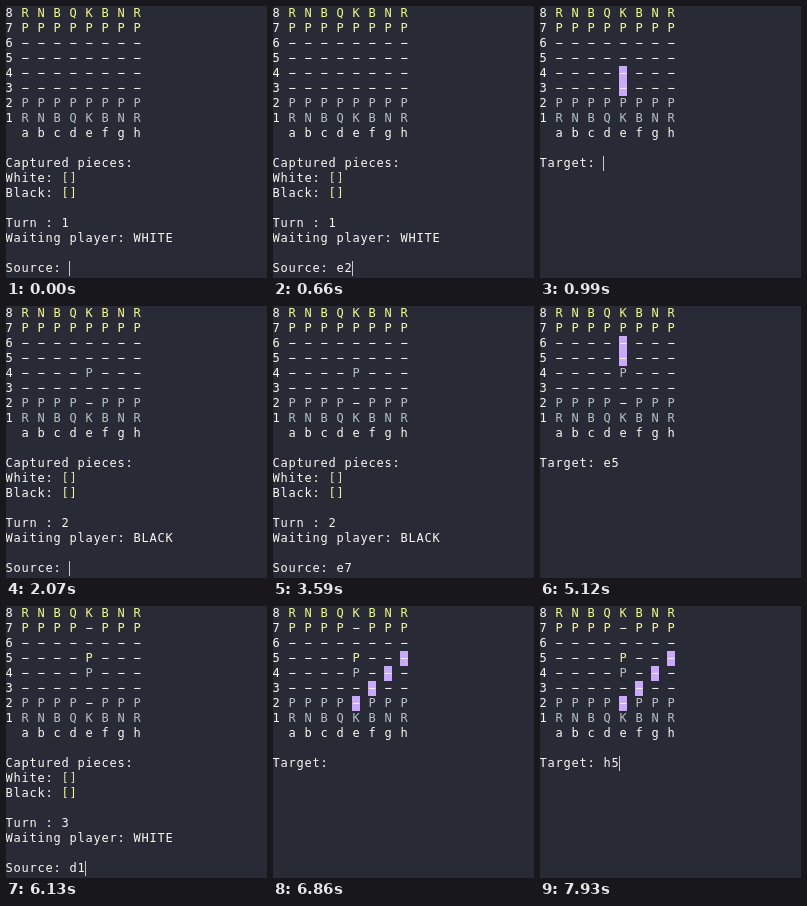
Animation, 261 px wide and 272 px high, one loop 8000 ms. Source, as an HTML page with a canvas:

```html
<!DOCTYPE html>
<html lang="en">
<head>
<meta charset="utf-8">
<title>Terminal chess</title>
<style>
  html, body { margin: 0; width: 100%; height: 100%; overflow: hidden; background: #282a36; }
  canvas { display: block; }
</style>
</head>
<body>
<canvas id="screen" width="261" height="272"></canvas>
<script>
const ctx = document.getElementById('screen').getContext('2d');
const LOOP = 8000, CELL_W = 8, CELL_H = 15, LEFT = -1;
const BACK = '#282a36', PLAIN = '#f8f8f2', YELLOW = '#f1fa8c',
      SILVER = '#b4c0c4', MARK = '#caa9fa', CURSOR = '#c8c8c8';

// Board positions from rank 8 down to rank 1.
const board = (...ranks) => ['RNBQKBNR', ...ranks, 'RNBQKBNR'];
const empty = '--------', pawns = 'PPPPPPPP', gap = 'PPPP-PPP', advanced = '----P---';
const start = board(pawns, empty, empty, empty, empty, pawns);
const afterWhite = board(pawns, empty, empty, advanced, empty, gap);
const afterBlack = board(gap, empty, advanced, advanced, empty, gap);

// Each scene lists its input steps: [time, typed text, cursor visible].
const scenes = [
  { board: start, turn: 1, player: 'WHITE',
    steps: [[0, '', 1], [260, '', 0], [400, 'e', 1], [660, 'e2', 1], [920, 'e2', 0]] },
  { board: start, moves: ['e4', 'e3'],
    steps: [[990, '', 1], [1390, 'e', 1], [1660, 'e4', 1]] },
  { board: afterWhite, turn: 2, player: 'BLACK',
    steps: [[2070, '', 1], [2600, '', 0], [2670, 'e', 1], [3060, 'e7', 1], [3590, 'e7', 0]] },
  { board: afterWhite, moves: ['e6', 'e5'],
    steps: [[3720, '', 1], [4250, 'e', 1], [4580, 'e5', 1], [5120, 'e5', 0]] },
  { board: afterBlack, turn: 3, player: 'WHITE',
    steps: [[5180, '', 1], [5660, '', 0], [5730, 'd', 1], [6130, 'd1', 1], [6660, 'd1', 0]] },
  { board: afterBlack, moves: ['e2', 'f3', 'g4', 'h5'],
    steps: [[6860, '', 0], [6920, '', 1], [7460, '', 0], [7530, 'h', 1], [7930, 'h5', 1]] }
];

function print(text, col, row, color = PLAIN) {
  ctx.fillStyle = color;
  [...text].forEach((char, i) =>
    ctx.fillText(char, LEFT + (col + i + 0.5) * CELL_W, row * CELL_H + 11));
}

function drawBoard({ board, moves = [] }) {
  board.forEach((rank, row) => {
    print(String(8 - row), 0, row);
    [...rank].forEach((piece, file) => {
      const col = 2 + file * 2;
      if (moves.includes('abcdefgh'[file] + (8 - row))) {
        ctx.fillStyle = MARK;
        ctx.fillRect(LEFT + col * CELL_W, row * CELL_H, CELL_W, CELL_H);
      }
      if (piece === '-') print('\u2212', col, row);
      else print(piece, col, row, row < 4 ? YELLOW : SILVER);
    });
  });
  print('a b c d e f g h', 2, 8);
}

function drawStatus({ turn, player }) {
  print('Captured pieces:', 0, 10);
  print('White:', 0, 11);
  print('[]', 7, 11, '#d9ddb0');
  print('Black:', 0, 12);
  print('[]', 7, 12, YELLOW);
  print('Turn : ' + turn, 0, 14);
  print('Waiting player: ' + player, 0, 15);
}

function drawPrompt(label, row, typed, cursor) {
  const line = label + ': ' + typed;
  print(line, 0, row);
  if (cursor) {
    ctx.fillStyle = CURSOR;
    ctx.fillRect(LEFT + line.length * CELL_W, row * CELL_H, 1, CELL_H);
  }
}

function draw(time) {
  const scene = scenes.findLast(s => s.steps[0][0] <= time);
  const [, typed, cursor] = scene.steps.findLast(s => s[0] <= time);
  ctx.fillStyle = BACK;
  ctx.fillRect(0, 0, 261, 272);
  ctx.font = '12px "DejaVu Sans Mono", monospace';
  ctx.textAlign = 'center';
  drawBoard(scene);
  if (scene.moves) {
    drawPrompt('Target', 10, typed, cursor);
  } else {
    drawStatus(scene);
    drawPrompt('Source', 17, typed, cursor);
  }
}

const begin = performance.now();
function tick() {
  draw((performance.now() - begin) % LOOP);
  requestAnimationFrame(tick);
}
tick();
</script>
</body>
</html>
```
